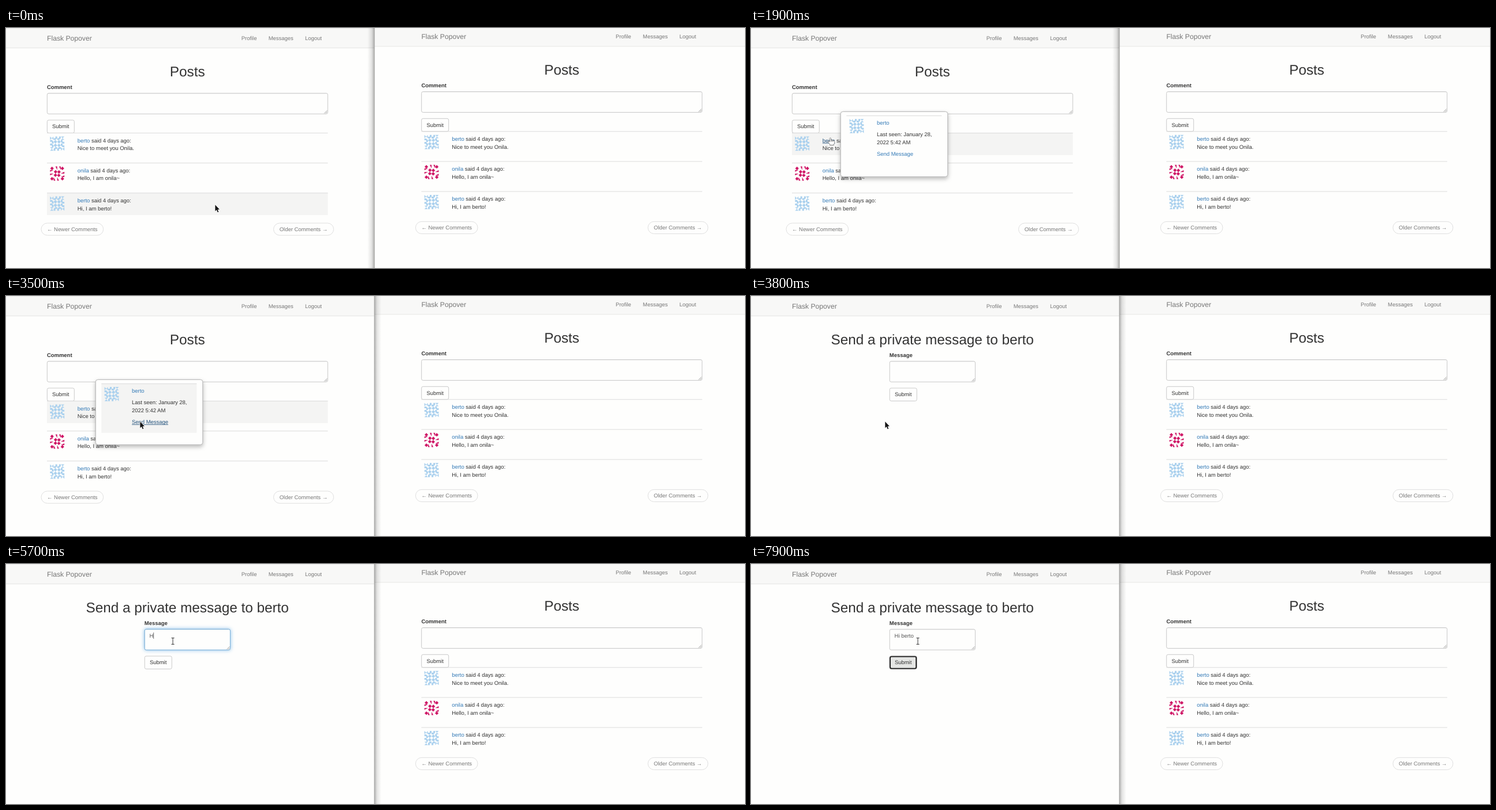
An HTML page with a canvas that plays this animation: 1280x417 px, repeating every 8 s.

```html
<!DOCTYPE html>
<html lang="en">
<head>
<meta charset="utf-8">
<title>Flask Popover</title>
<style>
html, body { margin: 0; width: 100%; height: 100%; overflow: hidden; background: #fefefd; }
canvas { display: block; width: 1280px; height: 417px; }
</style>
</head>
<body>
<canvas id="stage" width="1280" height="417"></canvas>
<script>
const ctx = document.getElementById('stage').getContext('2d');
const LOOP = 8000, ZOOM = 0.6757;
const PAPER = '#fefefd', HOVER = '#f4f4f3', INK = '#333', LINK = '#337ab7', LINK_HOVER = '#23527c';
const USER = 'berto', OTHER = 'onila';
const ROW_TOP = 182.5, ROW_STEP = 52.1;
const posts = [
  [USER, 'Nice to meet you Onila.'],
  [OTHER, 'Hello, I am onila~'],
  [USER, 'Hi, I am berto!']
];

// pointer: time, x, y
const path = [
  [0, 362, 307], [400, 362, 307], [700, 236, 198], [800, 236, 198], [1300, 137, 191],
  [2100, 137, 191], [2500, 192, 208], [2600, 192, 208], [3100, 232, 218], [3800, 232, 218],
  [4000, 232, 169], [4100, 232, 169], [4200, 287, 127], [4300, 287, 127], [4400, 289, 134]
];
// time, characters typed
const typing = [[5700, 1], [6000, 2], [6200, 4], [6600, 6], [6900, 7], [7300, 8]];
const glowSteps = [[4500, 0.2], [4600, 0.5], [4700, 0.8], [4900, 1], [7700, 0]];

function stepAt(list, t) {
  let v = 0;
  for (const [time, value] of list) if (t >= time) v = value;
  return v;
}

function pointerAt(t) {
  for (let i = 1; i < path.length; i++) {
    const [t0, x0, y0] = path[i - 1], [t1, x1, y1] = path[i];
    if (t < t1) {
      const k = (t - t0) / (t1 - t0);
      return { x: x0 + (x1 - x0) * k, y: y0 + (y1 - y0) * k };
    }
  }
  const [, x, y] = path[path.length - 1];
  return { x, y };
}

const within = (p, x0, y0, x1, y1) => p.x >= x0 && p.x <= x1 && p.y >= y0 && p.y <= y1;

function text(str, x, y, { size = 14, color = INK, bold = false, align = 'left' } = {}) {
  ctx.font = `${bold ? 'bold ' : ''}${size * ZOOM}px "Liberation Sans", Arial, sans-serif`;
  ctx.textRendering = 'geometricPrecision';
  ctx.textAlign = align;
  ctx.fillStyle = color;
  ctx.fillText(str, x, y);
  return ctx.measureText(str).width;
}

function link(str, x, y, hover) {
  const w = text(str, x, y, { color: hover ? LINK_HOVER : LINK });
  if (hover) rect(x, y + 0.9, w, 0.8, LINK_HOVER);
  return w;
}

function rect(x, y, w, h, color) {
  ctx.fillStyle = color;
  ctx.fillRect(x, y, w, h);
}

function box(x, y, w, h, r, { fill = PAPER, stroke = '#c4c4c4', width = 0.9 } = {}) {
  ctx.beginPath();
  ctx.roundRect(x, y, w, h, r);
  ctx.fillStyle = fill;
  ctx.fill();
  ctx.strokeStyle = stroke;
  ctx.lineWidth = width;
  ctx.stroke();
}

function poly(points, color) {
  ctx.beginPath();
  points.forEach(([x, y]) => ctx.lineTo(x, y));
  ctx.closePath();
  ctx.fillStyle = color;
  ctx.fill();
}

// four-fold pattern on a 4 x 4 grid
function avatar(name, cx, cy) {
  const blue = name === USER, color = blue ? '#abd1ee' : '#cf1766';
  const diamond = (x, y, r) => poly([[x, y - r], [x + r, y], [x, y + r], [x - r, y]], color);
  ctx.save();
  ctx.translate(cx, cy);
  ctx.scale(6.2, 6.2);
  for (let i = 0; i < 4; i++) {
    if (blue) {
      poly([[-2, -2], [-1.5, -1.5], [-2, -1.05]], color);
      poly([[-1.05, -2], [-1.5, -1.5], [-1.05, -1.05]], color);
      for (const x of [-1, 0])
        poly([[x, -1.5], [x + 0.5, -1.5], [x + 0.5, -2], [x + 1, -2], [x + 1, -1.5],
          [x + 0.5, -1], [x, -1]], color);
      diamond(-0.5, -0.5, 0.5);
    } else {
      diamond(-1.45, -1.45, 0.5);
      for (const x of [-1, 0]) poly([[x + 0.5, -2], [x + 1, -2], [x + 1, -1]], color);
      diamond(-0.45, -0.5, 0.5);
    }
    ctx.rotate(Math.PI / 2);
  }
  ctx.restore();
}

function field(x, w, glow = 0) {
  if (glow) {
    ctx.save();
    ctx.shadowColor = `rgba(102,175,233,${0.75 * glow})`;
    ctx.shadowBlur = 6;
    box(x, 113.3, w, 36, 2.7);
    ctx.restore();
  }
  const mix = (a, b) => Math.round(a + (b - a) * glow);
  box(x, 113.3, w, 36, 2.7, { stroke: `rgb(${mix(194, 102)},${mix(194, 168)},${mix(194, 218)})` });
  rect(x + 2, 114, w - 4, 0.7, 'rgba(0,0,0,.06)');
  ctx.strokeStyle = '#777';
  ctx.lineWidth = 0.7;
  ctx.beginPath();
  for (const d of [5, 2.5]) {
    ctx.moveTo(x + w - 1 - d, 148.3);
    ctx.lineTo(x + w - 1, 148.3 - d);
  }
  ctx.stroke();
}

function button(x, focus) {
  if (focus) {
    box(x - 0.3, 159.8, 47.4, 22.9, 3.2, { stroke: '#9a9a9a', width: 1 });
    box(x + 0.9, 161, 45, 20.5, 2.2, { fill: '#e5e6e4', stroke: '#111', width: 1.7 });
  } else {
    box(x, 160, 47, 22.4, 2.7);
  }
  text('Submit', x + 8.7, 174.4);
}

function navbar(left, right) {
  rect(left, 0, right - left, 34.3, '#f8f8f7');
  rect(left, 34.2, right - left, 0.9, '#e3e3e2');
  rect(left, 0, right - left, 0.7, '#e6e6e5');
  text('Flask Popover', 71, 21.9, { size: 18, color: '#777' });
  [['Profile', 407.7], ['Messages', 454.7], ['Logout', 518]]
    .forEach(([label, x]) => text(label, x, 20.9, { color: '#777' }));
}

function heading(str) {
  text(str, 314.2, 84, { size: 36, align: 'center' });
}

function postsPage(hoverRow = -1, linkHover = false) {
  heading('Posts');
  text('Comment', 71, 106.1, { bold: true });
  field(71.3, 486);
  button(71.3);
  posts.forEach(([name, message], i) => {
    const y = ROW_TOP + i * ROW_STEP;
    if (i === hoverRow) rect(71, y, 486.5, 38.3, HOVER);
    rect(71, y - 0.4, 486.5, 0.9, '#d8d8d8');
    avatar(name, 88.7, y + 18.3);
    const w = link(name, 123.8, y + 16.3, i === 0 && linkHover);
    text(' said 4 days ago:', 123.8 + w, y + 16.3);
    text(message, 123.8, y + 29.8);
  });
  const pill = { stroke: '#dcdcdc' };
  box(61, 339, 107.6, 21.2, 10.6, pill);
  text('← Newer Comments', 71, 353, { color: '#777' });
  box(463.5, 339, 104, 21.2, 10.6, pill);
  text('Older Comments →', 473.7, 353, { color: '#777' });
}

function popover(hover, linkHover) {
  ctx.save();
  ctx.shadowColor = 'rgba(0,0,0,.25)';
  ctx.shadowBlur = 7;
  ctx.shadowOffsetY = 3.4;
  box(155.3, 145.3, 185.4, 113, 4);
  ctx.restore();
  box(155.3, 145.3, 185.4, 113, 4, { stroke: '#b5b5b5' });
  if (hover) rect(165.3, 152.4, 165, 85.3, HOVER);
  rect(165.3, 152, 165, 0.9, '#d8d8d8');
  avatar(USER, 183, 170.3);
  link(USER, 218, 168.3);
  text('Last seen: January 28,', 218, 188.4);
  text('2022 5:42 AM', 218, 201.9);
  link('Send Message', 218, 222.3, linkHover);
}

function messagePage(t) {
  const typed = 'Hi berto'.slice(0, stepAt(typing, t));
  const focused = t >= 4700 && t < 7700;
  heading('Send a private message to ' + USER);
  text('Message', 239.8, 106.1, { bold: true });
  field(240.2, 148.2, stepAt(glowSteps, t));
  button(240.2, t >= 7700);
  const w = text(typed, 248.6, 127.9, { color: '#555' });
  if (focused && (t < 5200 || t >= 5700)) rect(248.5 + w, 119, 0.8, 11, '#555');
}

const shapes = {
  arrow: [[0, 0], [0, 11], [2.5, 8.8], [4.3, 13], [6, 12.2], [4.3, 8.2], [7.6, 8]],
  hand: [[-1, 0.3], [0, -0.3], [1, 0.3], [1, 4], [3, 3.6], [5, 4.3], [7.2, 5], [7.3, 8.5],
    [6, 10.2], [6, 12], [-0.6, 12], [-0.6, 10.4], [-3.7, 6.6], [-2.8, 5.4], [-1, 7]]
};

function pointer({ x, y }, kind) {
  ctx.save();
  ctx.translate(x, y);
  ctx.lineJoin = 'round';
  if (kind === 'beam') {
    for (const [color, width] of [['#fff', 2.2], ['#333', 1]]) {
      ctx.beginPath();
      ctx.moveTo(-2.5, -5.5); ctx.lineTo(2.5, -5.5);
      ctx.moveTo(0, -5.5); ctx.lineTo(0, 5.5);
      ctx.moveTo(-2.5, 5.5); ctx.lineTo(2.5, 5.5);
      ctx.strokeStyle = color;
      ctx.lineWidth = width;
      ctx.stroke();
    }
  } else {
    const arrow = kind === 'arrow';
    ctx.beginPath();
    shapes[kind].forEach(([px, py]) => ctx.lineTo(px + 0.3, py + 0.3));
    ctx.closePath();
    ctx.lineWidth = arrow ? 1.4 : 1;
    ctx.strokeStyle = arrow ? '#fff' : '#1c1c1c';
    ctx.fillStyle = arrow ? '#161616' : '#fff';
    ctx.stroke();
    ctx.fill();
    if (!arrow) {
      ctx.lineWidth = 0.6;
      ctx.beginPath();
      for (const px of [1.3, 3.3, 5.3]) { ctx.moveTo(px, 4.4); ctx.lineTo(px, 6.6); }
      ctx.stroke();
    }
  }
  ctx.restore();
}

function divider(leftActive) {
  const from = 638, to = leftActive ? 650 : 626;
  const g = ctx.createLinearGradient(from, 0, to, 0);
  g.addColorStop(0, 'rgba(0,0,0,.3)');
  g.addColorStop(0.4, 'rgba(0,0,0,.1)');
  g.addColorStop(1, 'rgba(0,0,0,0)');
  rect(Math.min(from, to), 0, 12, 417, g);
  rect(637.6, 0, 1, 417, '#a2a2a1');
}

function leftWindow(t) {
  const p = pointerAt(t);
  let kind = 'arrow';
  navbar(0, 638);
  if (t < 3800) {
    const open = t >= 1900;
    const onName = within(p, 123, 189, 146, 201);
    const inPopover = open && p.x > 155;
    const onSend = inPopover && within(p, 218, 213, 281, 225);
    const row = open ? 0 : [0, 1, 2].find(i => {
      const y = ROW_TOP + i * ROW_STEP;
      return within(p, 71, y, 557, y + 38.3);
    });
    postsPage(row, onName);
    if (open) popover(inPopover && within(p, 165, 152, 331, 238), onSend);
    if (onName || (onSend && t < 3500)) kind = 'hand';
    else if (!inPopover && within(p, 146, 189, 217, 202)) kind = 'beam';
  } else {
    messagePage(t);
    if (within(p, 240, 113, 388, 149)) kind = 'beam';
  }
  return { p, kind };
}

function draw(t) {
  rect(0, 0, 1280, 417, PAPER);
  const { p, kind } = leftWindow(t);
  ctx.save();
  ctx.beginPath();
  ctx.rect(638, 0, 642, 417);
  ctx.clip();
  ctx.translate(648.4, -2.7);
  navbar(-11, 632);
  postsPage();
  ctx.restore();
  divider(t >= 3400);
  pointer(p, kind);
}

function frame() {
  draw(Math.floor((performance.now() % LOOP) / 100) * 100);
  requestAnimationFrame(frame);
}
frame();
</script>
</body>
</html>
```
